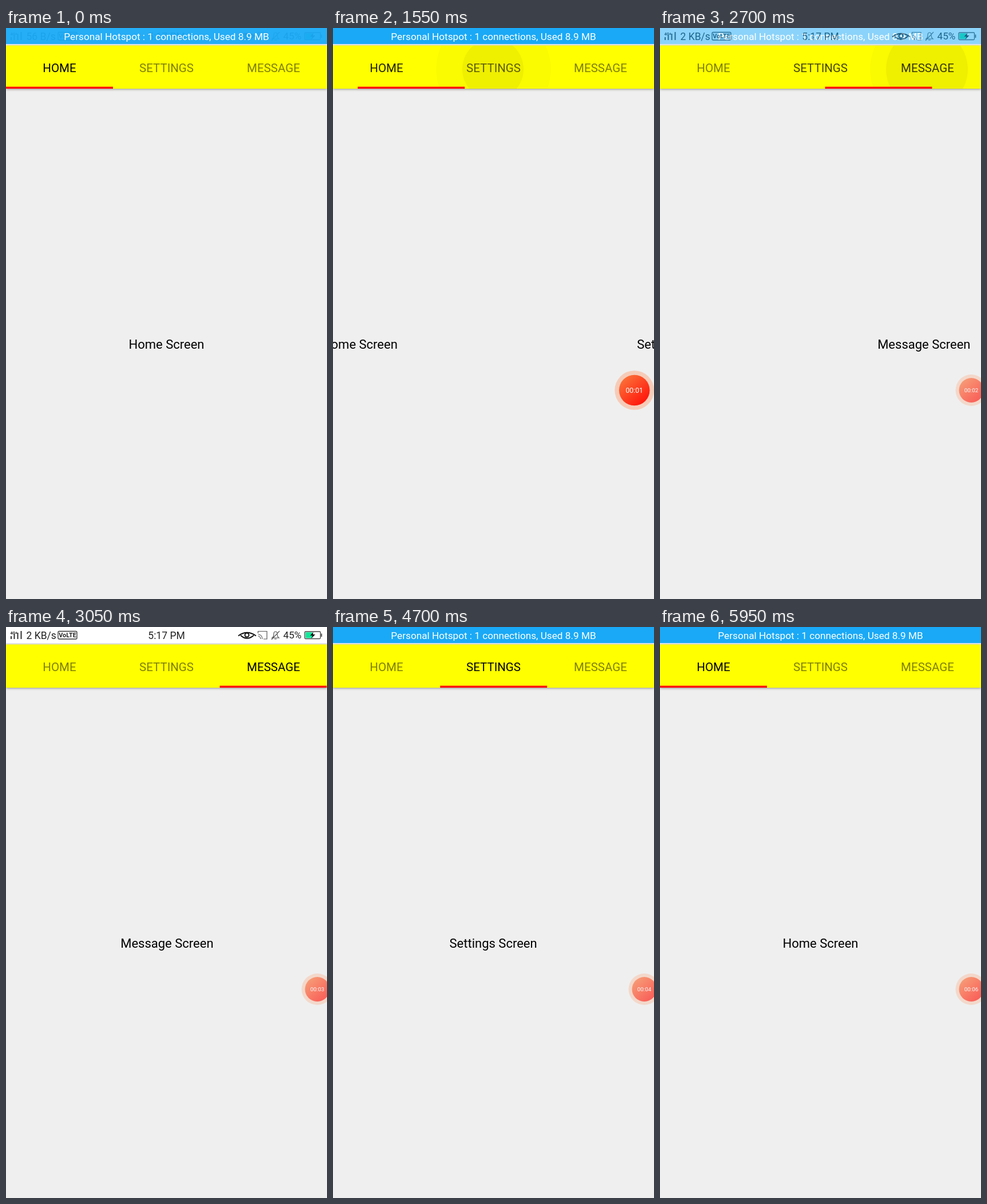
These frames come from a looping animation (561x997 px, 6 s). An HTML page:

```html
<!DOCTYPE html>
<html lang="en">
<head>
<meta charset="utf-8">
<style>
  html, body { margin: 0; width: 100%; height: 100%; overflow: hidden; background: #efefef; }
  svg { display: block; width: 100vw; height: 100vh; font-family: Roboto, sans-serif; }
  .mid { text-anchor: middle; }
  #bar { filter: drop-shadow(0 1px 2px rgba(0, 0, 0, .4)); }
</style>
</head>
<body>
<svg viewBox="0 0 561 997">
  <defs>
    <linearGradient id="hot" x1=".15" y1=".1" x2=".8" y2=".85">
      <stop offset="0" stop-color="#fb7038"/>
      <stop offset="1" stop-color="#ff1a0e"/>
    </linearGradient>
    <clipPath id="barClip"><rect y="30.5" width="561" height="75.5"/></clipPath>
  </defs>
  <rect width="561" height="997" fill="#efefef"/>
  <g id="pages" class="mid" font-size="22"></g>

  <rect id="bar" y="30.5" width="561" height="75.5" fill="#ff0"/>
  <g clip-path="url(#barClip)">
    <circle id="halo" cy="72" r="100" />
    <circle id="ripple" cy="72" />
  </g>
  <g id="labels" class="mid" font-size="20.5"></g>
  <rect id="indicator" y="102.5" width="187" height="3.5" fill="#f11"/>

  <g id="status" fill="#222">
    <rect width="561" height="28" fill="#fff"/>
    <text x="7.5" y="13" font-size="7" font-weight="700">4G+</text>
    <path d="M9 16v5M14.5 13v8M20.5 10v11M26.5 7v14" stroke="#333" stroke-width="2"/>
    <text id="speed" x="35.5" y="20.5" font-size="17.5">2 KB/s</text>
    <rect x="91" y="7.5" width="33" height="13.5" rx="2" fill="none" stroke="#333" stroke-width="1.3"/>
    <text class="mid" x="107.5" y="18.3" font-size="10.8" font-weight="700">VoLTE</text>
    <text class="mid" x="280.5" y="20.5" font-size="17.5">5:17 PM</text>
    <g fill="none" stroke="#111" stroke-width="2">
      <path d="M406 15.5Q421 4 437 15.5M410 14.5Q421 25 433 14.5"/>
      <circle cx="421" cy="14" r="3.5"/>
      <g stroke="#555" stroke-width="1.2">
        <path d="M440.5 11V7.5H456V21H450M440.5 13q7 0 7.5 8M440.5 16q4 0 4.5 5"/>
        <path d="M465 19q3-2 3-7 0-4 3-4t3 4q0 5 3 7ZM469 21h4M464 22L478 7"/>
      </g>
    </g>
    <text x="484.5" y="20" font-size="17.2">45%</text>
    <rect x="522" y="8" width="27.5" height="12.5" rx="1.5" fill="#fff" stroke="#444" stroke-width="1.3"/>
    <rect x="523.3" y="9.3" width="12" height="10" fill="#14e69b"/>
    <rect x="550.5" y="11.5" width="1.8" height="5.5" fill="#444"/>
    <path d="M537 8.8L531.5 15H535.5L533.5 20L540.5 13H536.5Z" fill="#111"/>
  </g>
  <g id="hotspot">
    <rect width="561" height="28" fill="#1aa9f6"/>
    <text class="mid" x="280.5" y="21" font-size="17.2" fill="#fff">Personal Hotspot : 1 connections, Used 8.9 MB</text>
  </g>

  <g id="bubble">
    <circle r="34.3" fill="rgb(255,150,100)" fill-opacity=".4"/>
    <circle r="26.8" fill="url(#hot)"/>
    <text id="timer" class="mid" y="4.4" font-size="12.3" fill="#fff"></text>
  </g>
</svg>
<script>
const LOOP = 6000, STEP = 50, W = 561, TAB = 187;
const $ = id => document.getElementById(id);
const set = (el, attrs) => { for (const k in attrs) el.setAttribute(k, attrs[k]); };
const clamp = v => Math.max(0, Math.min(1, v));
const ramp = (t, from, to) => clamp((t - from) / (to - from));
const mix = (a, b, k) => a + (b - a) * k;

// Critically damped spring, 0 to 1
const spring = ms => {
  const u = Math.max(0, ms) * 0.01826;
  return 1 - Math.exp(-u) * (1 + u);
};

const taps = [
  { at: 1400, from: 0, to: 1, x0: 0, x1: 186 },
  { at: 2500, from: 1, to: 2, x0: 186, x1: 374 },
  { at: 4100, from: 2, to: 1, x0: 374, x1: 187 },
  { at: 5130, from: 1, to: 0, x0: 187, x1: 0 }
];

function addText(parent, text, x, y) {
  const el = document.createElementNS("http://www.w3.org/2000/svg", "text");
  el.textContent = text;
  set(el, { x, y });
  return $(parent).appendChild(el);
}
const names = ["Home", "Settings", "Message"];
const pages = names.map(n => addText("pages", n + " Screen", W / 2, 560.3));
const labels = names.map((n, i) => addText("labels", n.toUpperCase(), TAB * (i + 0.5), 77.2));

function drawTabs(t) {
  const tap = taps.filter(p => p.at <= t).pop() || { at: -9999, from: 0, to: 0, x0: 0, x1: 0 };
  const age = t - tap.at;
  const page = mix(tap.from, tap.to, spring(age - 72));
  const x = mix(tap.x0, tap.x1, spring(age - 100));
  pages.forEach((el, i) => set(el, { x: W / 2 + (i - page) * W }));
  labels.forEach((el, i) => set(el, { "fill-opacity": 0.5 + 0.5 * clamp(1 - Math.abs(i - x / TAB)) }));
  set($("indicator"), { x });

  const fade = 1 - ramp(age, 250, 480);
  const cx = TAB * (tap.to + 0.5);
  set($("halo"), { cx, "fill-opacity": 0.02 * ramp(age, 0, 120) * fade });
  set($("ripple"), { cx: cx - 1, r: 100 * ramp(age, 0, 280), "fill-opacity": 0.045 * fade });
}

function drawStatus(t) {
  const shown = t < 2000 ? ramp(t, -760, 40) : 1 - ramp(t, 2500, 2900) + ramp(t, 3590, 3990);
  set($("hotspot"), { opacity: shown });
  $("speed").textContent = t < 2000 ? "56 B/s" : "2 KB/s";
}

function drawBubble(t) {
  const k = ramp(t, 1850, 2050);
  set($("bubble"), {
    transform: `translate(${mix(526.7, 544, k)} 632.5) scale(${mix(1, 0.8, k)})`,
    opacity: t < 200 ? 0 : mix(1, 0.66, k)
  });
  $("timer").textContent = "00:0" + Math.floor((t + 100) / 1000);
}

function draw(now) {
  const t = Math.floor((now % LOOP) / STEP) * STEP;
  drawTabs(t);
  drawStatus(t);
  drawBubble(t);
}

let start;
function tick(now) {
  start ??= now;
  draw(now - start);
  requestAnimationFrame(tick);
}
draw(0);
requestAnimationFrame(tick);
</script>
</body>
</html>
```
